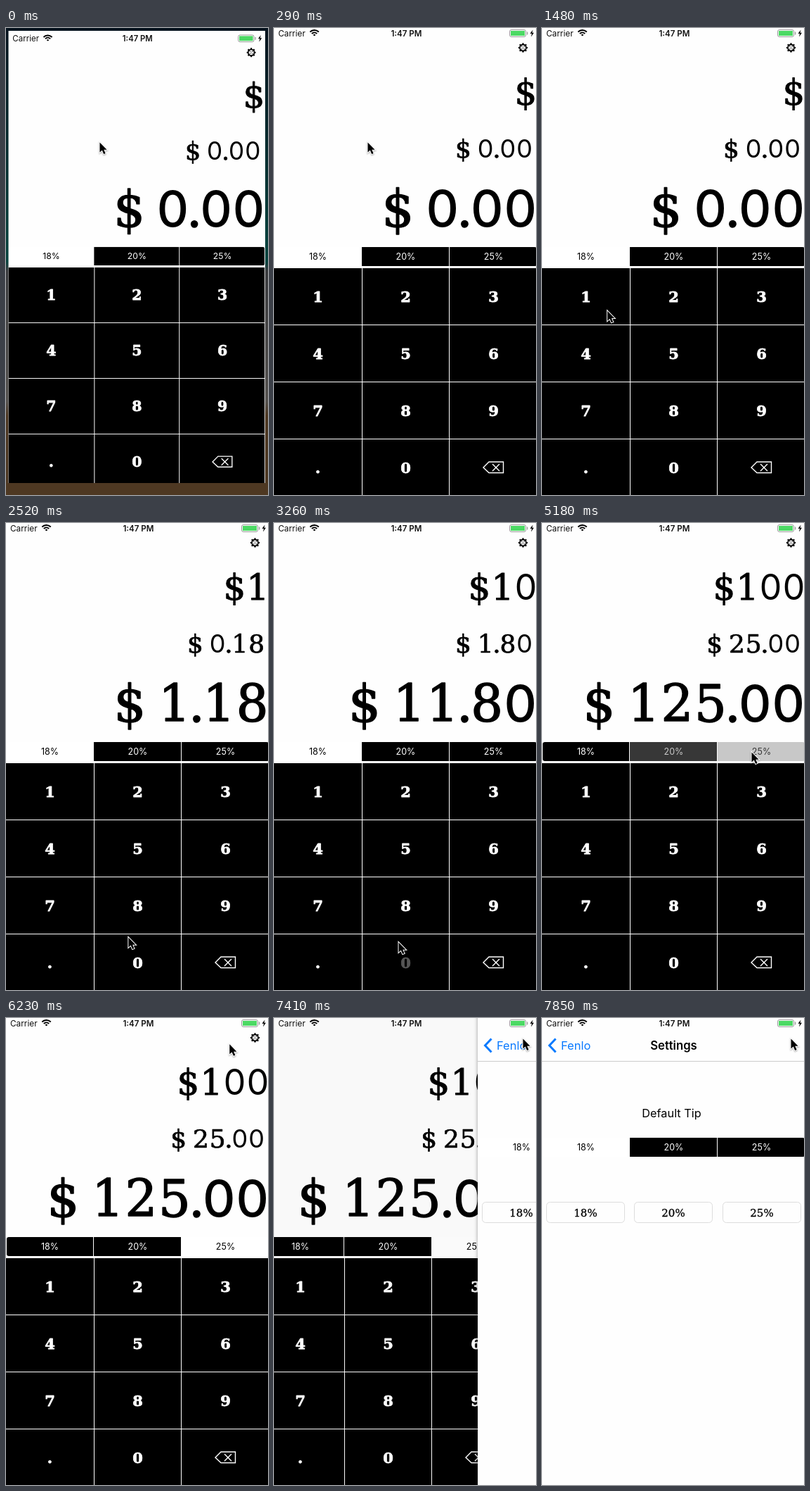
Recreate the animation shown at these times as an HTML page with a canvas. Size 373 px wide and 663 px high, loop 8 s.

```html
<!DOCTYPE html>
<html lang="en">
<head>
<meta charset="utf-8">
<title>Tip calculator</title>
<style>
html, body { margin: 0; width: 373px; height: 663px; overflow: hidden; background: #fff; }
canvas { display: block; }
</style>
</head>
<body>
<canvas id="stage" width="373" height="663"></canvas>
<script>
const c = document.getElementById('stage').getContext('2d');
const LOOP = 8000, TICKS = 54, W = 373, H = 663;
const UI = 'Inter, "Open Sans", sans-serif', SLAB = '"DejaVu Serif", "Noto Serif", serif';
const BLUE = '#0a7aff';
const RATES = [18, 20, 25];

// Times in ticks
const BILL = '100', TYPED = [15, 20, 23];
const PICK_20 = 29, PICK_25 = 34.2;
const PUSH_MS = 7358.4;

// Pointer moves: from tick, to tick, x, y
const MOVES = [
  [4, 12, 92, 405],
  [15, 18, 177, 595],
  [23, 27, 195, 323],
  [31, 33, 298, 325],
  [37, 39, 160, 71],
  [39, 46, 354, 29]
];

const lerp = (a, b, k) => a + (b - a) * k;
const easeOut = k => 1 - (1 - Math.min(1, Math.max(0, k))) ** 3;
const column = i => 62.5 + 125 * i;
const grey = v => `rgb(${Array(3).fill(Math.round(255 * v))})`;

function text(s, x, y, font, color = '#000', align = 'center', bolder = 0) {
  c.font = font;
  c.fillStyle = c.strokeStyle = color;
  c.textAlign = align;
  c.fillText(s, x, y);
  if (bolder) {
    c.lineWidth = bolder;
    c.lineJoin = 'round';
    c.strokeText(s, x, y);
    c.lineJoin = 'miter';
  }
}

function rect(x, y, w, h, color) {
  c.fillStyle = color;
  c.fillRect(x, y, w, h);
}

function line(points, color, width, close) {
  c.beginPath();
  points.forEach(([x, y]) => c.lineTo(x, y));
  if (close) c.closePath();
  c.strokeStyle = color;
  c.lineWidth = width;
  c.stroke();
}

// Even typewriter spacing, set from the right edge, with round sans zeros
function money(s, right, base, size, weight) {
  let x = right;
  for (const ch of [...s].reverse()) {
    const step = size * (/[. ]/.test(ch) ? .22 : .66);
    x -= step;
    if (ch === '0') text(ch, x + step / 2, base, `${weight} ${size}px ${UI}`);
    else text(ch, x + step / 2, base, `${size}px ${SLAB}`, '#000', 'center', size * .02);
  }
}

// lit[i]: how far segment i is selected, 0 to 1
function segments(y, lit) {
  c.save();
  c.beginPath();
  c.roundRect(1, y, 373, 27, 3);
  c.clip();
  lit.forEach((v, i) => rect(125 * i, y, 124, 27, grey(v)));
  c.restore();
  lit.forEach((v, i) => text(RATES[i] + '%', column(i), y + 18, `12.5px ${UI}`, grey(1 - v)));
}

function gear(x, y) {
  c.save();
  c.translate(x, y);
  c.beginPath();
  c.arc(0, 0, 4.5, 0, 7);
  c.strokeStyle = '#000';
  c.lineWidth = 1.8;
  c.stroke();
  for (let i = 0; i < 8; i++) {
    line([[4.6, 0], [6.6, 0]], '#000', 2.2);
    if (i % 2) line([[1, 0], [4.6, 0]], '#000', .9);
    c.rotate(Math.PI / 4);
  }
  c.restore();
}

function keypad(pressed) {
  rect(0, 341, 376, 340, '#000');
  for (let i = 1; i <= 3; i++) {
    rect(Math.round(124.5 * i), 341, 1, 340, '#fff');
    rect(0, 340 + 81 * i, 376, 1, '#fff');
  }
  [...'123456789.0'].forEach((ch, i) => {
    const color = ch === pressed ? '#555' : '#fff';
    text(ch, column(i % 3), 388.5 + 81 * Math.floor(i / 3), `bold 21px ${SLAB}`, color, 'center', .8);
  });
  line([[298, 624], [306, 616], [326.5, 616], [326.5, 631.5], [306, 631.5]], '#fff', 1.4, true);
  for (const d of [-5, 5]) line([[316 - d, 619], [316 + d, 629]], '#fff', 1.4);
}

function calculator(n) {
  const typed = TYPED.filter(t => n >= t).length;
  const bill = BILL.slice(0, typed);
  const rate = RATES[n < PICK_20 ? 0 : n < PICK_25 ? 1 : 2];
  const tip = bill * rate / 100;
  rect(-2, -8, 380, 680, '#fefefe');
  gear(354.5, 28);
  money('$' + bill, 375, 108.5, 50, 400);
  money('$ ' + tip.toFixed(2), 368.5, 184, 36, 400);
  money('$ ' + (+bill + tip).toFixed(2), 374.5, 281.5, 72, 500);

  const to20 = easeOut((n - PICK_20) / 2), to25 = easeOut((n - PICK_25) / 2);
  segments(311, [1 - to20, to20 - to25, to25]);
  keypad(BILL[TYPED.indexOf(n + 1)]);
}

function settings() {
  c.save();
  c.shadowColor = 'rgba(0,0,0,.4)';
  c.shadowBlur = 5;
  rect(0, -10, 380, 690, '#fefefe');
  c.restore();
  rect(0, 61, 376, 1, '#ccc');
  line([[19.5, 29.5], [10.5, 39], [19.5, 48.5]], BLUE, 3);
  text('Fenlo', 27, 45, `16.5px ${UI}`, BLUE, 'left');
  text('Settings', 187.5, 45, `600 16.7px ${UI}`);
  text('Default Tip', 184.5, 141, `16.3px ${UI}`);
  segments(170, [1, 0, 0]);
  RATES.forEach((rate, i) => {
    const x = 6.5 + Math.round(125.3 * i);
    c.beginPath();
    c.roundRect(x, 261.5, 111, 29, 5);
    c.strokeStyle = '#ddd';
    c.lineWidth = 1;
    c.stroke();
    text(rate + '%', x + 55.5, 282, `15px ${SLAB}`, '#000', 'center', .3);
  });
}

function statusBar() {
  text('Carrier', 6, 11.5, `11.8px ${UI}`, '#111', 'left');
  text('1:47 PM', 188.5, 11.5, `600 11.6px ${UI}`, '#111');

  c.strokeStyle = '#000';
  c.lineWidth = 2;
  for (const r of [1.5, 5, 8.5]) {
    c.beginPath();
    c.arc(57.5, 11.5, r, -Math.PI * .76, -Math.PI * .24);
    c.stroke();
  }

  c.beginPath();
  c.roundRect(335.5, 2.5, 23, 10, 2.5);
  c.strokeStyle = '#999';
  c.lineWidth = 1;
  c.stroke();
  rect(337, 4, 20, 7, '#4cd964');
  rect(360, 5.5, 1.3, 4, '#999');
  c.fillStyle = '#000';
  c.fill(new Path2D('M368.5 2.5L364.5 8H367L366 12.5L370 6.8H367.5Z'));
}

function pointer(n) {
  let x = 133, y = 162;
  for (const [from, to, toX, toY] of MOVES) {
    const k = easeOut((n - from) / (to - from));
    x = lerp(x, toX, k);
    y = lerp(y, toY, k);
  }
  const arrow = new Path2D('M.5 .5V14.5L3.8 11.6L6.2 17L8.6 16L6.3 10.8H10.6Z');
  c.save();
  c.translate(x, y);
  c.shadowColor = 'rgba(0,0,0,.35)';
  c.shadowBlur = 2;
  c.shadowOffsetY = 1;
  c.strokeStyle = '#fff';
  c.lineWidth = 2;
  c.stroke(arrow);
  c.shadowColor = 'transparent';
  c.fillStyle = '#000';
  c.fill(arrow);
  c.restore();
}

function desktop() {
  const g = c.createLinearGradient(0, 0, 0, H);
  g.addColorStop(0, '#06131e');
  g.addColorStop(.5, '#07443f');
  g.addColorStop(.52, '#3a3b3e');
  g.addColorStop(.8, '#55524f');
  g.addColorStop(.83, '#4e3822');
  rect(0, 0, W, H, g);
}

function draw(now) {
  const n = Math.min(TICKS - 1, Math.floor((now % LOOP + 7) * TICKS / LOOP));
  const inset = Math.max(0, 1 - n / 2);
  // Critically damped spring
  const swing = Math.max(0, n * LOOP / TICKS - PUSH_MS) * .018;
  const push = 1 - (1 + swing) * Math.exp(-swing);

  desktop();
  c.save();
  c.beginPath();
  c.rect(3.5 * inset, 4 * inset, W - 7.5 * inset, H - 21 * inset);
  c.clip();
  c.translate(3.5 * inset, 7.5 * inset);
  c.scale(1 - .025 * inset, 1 - .025 * inset);

  c.save();
  c.translate(Math.round(-.3 * W * push), 0);
  calculator(n);
  c.restore();
  if (push > 0) {
    rect(0, 0, W, H, `rgba(0,0,0,${.08 * push})`);
    c.save();
    c.translate(Math.floor(W * (1 - push) + .3), 0);
    settings();
    c.restore();
  }
  statusBar();
  c.restore();
  pointer(n);
  requestAnimationFrame(draw);
}
requestAnimationFrame(draw);
</script>
</body>
</html>
```
